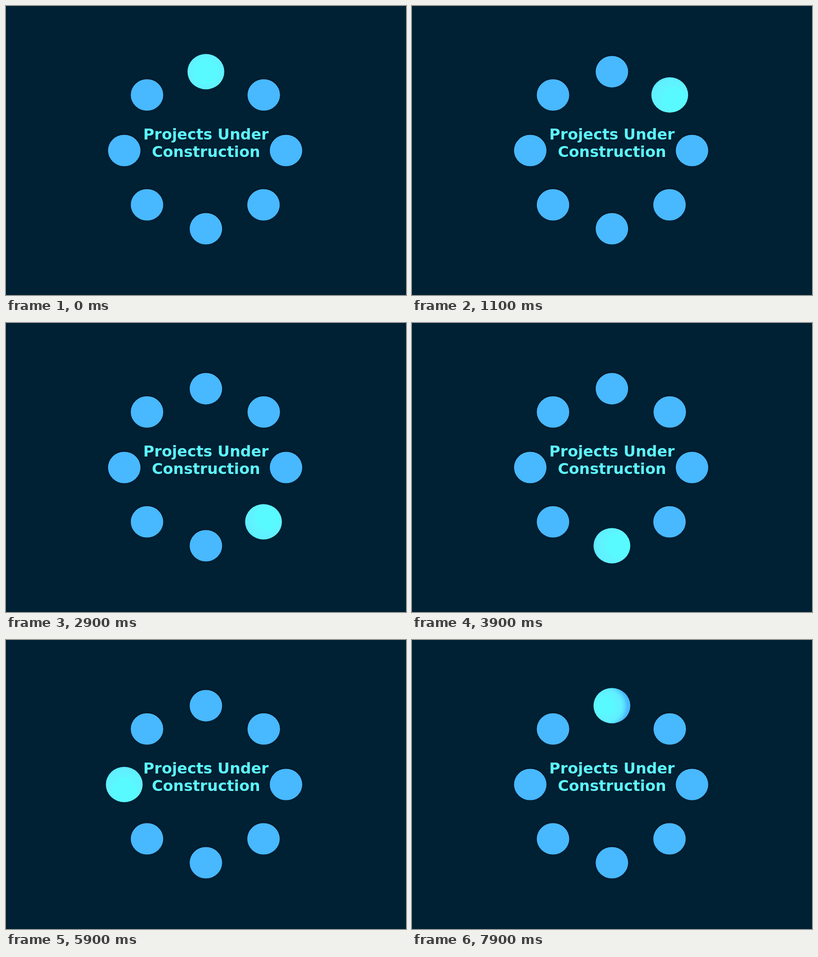
An HTML page with a canvas for the animation above (8 s loop, 800 by 580 pixels).

```html
<!DOCTYPE html>
<html lang="en">
<head>
<meta charset="utf-8">
<title>Projects Under Construction</title>
<style>
html, body { margin: 0; width: 100%; height: 100%; overflow: hidden; background: #002033; }
canvas, svg { position: absolute; left: 0; top: 0; display: block; }
text { font: bold 30px "DejaVu Sans", Verdana, sans-serif; text-anchor: middle; fill: #5cf6ff; }
.shade { fill: #00121f; }
</style>
</head>
<body>
<canvas id="stage" width="800" height="580"></canvas>
<svg width="800" height="580">
  <g class="shade" transform="translate(1 1)">
    <text x="400" y="268" class="shade">Projects Under</text>
    <text x="400" y="303" class="shade">Construction</text>
  </g>
  <text x="400" y="268">Projects Under</text>
  <text x="400" y="303">Construction</text>
</svg>
<script>
const ctx = document.getElementById('stage').getContext('2d');
const LOOP = 8000, STEP = 100;
const BLUE = '#48b8ff';
const dots = [
  [399.8, 131.8], [515.5, 178.5], [560, 290], [515, 399],
  [399.8, 447], [282, 399], [236.5, 290], [282, 178.5]
];

function oval(x, y, rx, ry) {
  ctx.beginPath();
  ctx.ellipse(x, y, rx, ry, 0, 0, Math.PI * 2);
}

// Spotlight that travels clockwise, one dot per second
function lightAt(t) {
  const a = t / LOOP * Math.PI * 2;
  const fade = Math.min(1, Math.max(0, (t - 7600) / 300));
  return {
    x: 399.5 + 163 * Math.sin(a),
    y: 289.5 - 157.5 * Math.cos(a),
    r: 62,
    k: 1 - 0.25 * fade
  };
}

function glow({ x, y, r, k }) {
  const g = ctx.createRadialGradient(x, y, 0, x, y, r);
  g.addColorStop(0, '#58faff');
  g.addColorStop(0.38 * k, '#58faff');
  g.addColorStop(0.42 * k, '#5ef5ff');
  g.addColorStop(0.7 * k, '#60efff');
  g.addColorStop(0.82 * k, '#58dcff');
  g.addColorStop(0.96 * k, BLUE);
  g.addColorStop(1, BLUE);
  return g;
}

function draw(t) {
  ctx.fillStyle = '#002033';
  ctx.fillRect(0, 0, 800, 580);

  for (const [x, y] of dots) {
    ctx.fillStyle = '#001522';
    oval(x, y - 1, 33.5, 32.5);
    ctx.fill();
    ctx.fillStyle = BLUE;
    oval(x, y, 32.5, 31.6);
    ctx.fill();
  }

  // The light reveals a slightly larger dot wherever it reaches
  const light = lightAt(t);
  ctx.fillStyle = glow(light);
  for (const [x, y] of dots) {
    if (Math.hypot(x - light.x, y - light.y) > light.r + 38) continue;
    ctx.save();
    oval(x, y, 36.8, 35.5);
    ctx.clip();
    oval(light.x, light.y, light.r, light.r);
    ctx.fill();
    ctx.restore();
  }
}

function tick() {
  const t = performance.now() % LOOP;
  draw(Math.floor(t / STEP) * STEP);
  requestAnimationFrame(tick);
}
tick();
</script>
</body>
</html>
```
